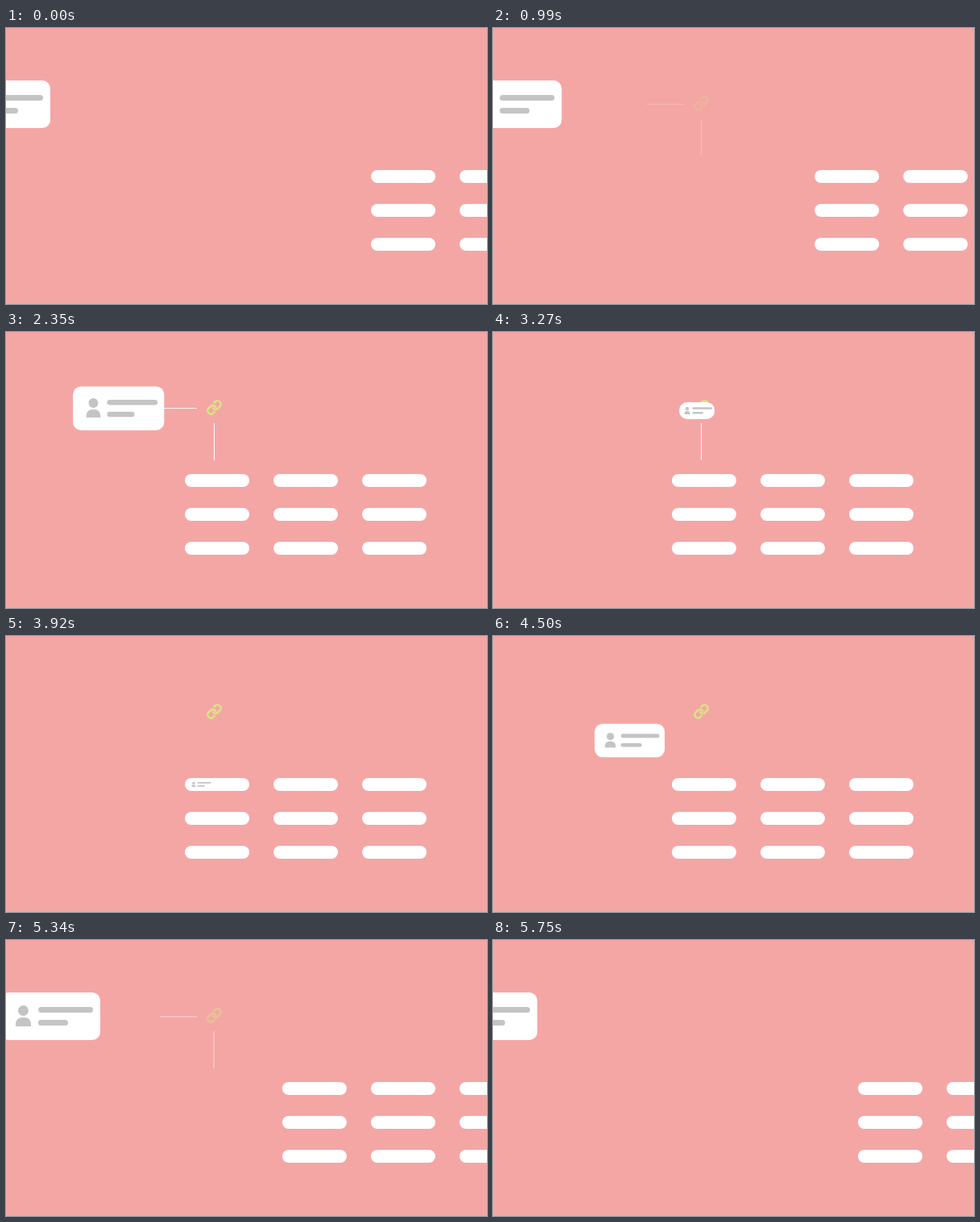
Write an HTML page that moves like this. It is 597 by 342 pixels and loops after 5.88 s.

```html
<!DOCTYPE html>
<html lang="en">
<head>
<meta charset="utf-8">
<title>Contact linking</title>
<style>
  html, body { margin: 0; width: 100%; height: 100%; overflow: hidden; background: #f4a6a5; }
  svg { display: block; width: 597px; height: 342px; }
</style>
</head>
<body>
<svg viewBox="0 0 597 342">
  <defs>
    <rect id="cell" width="80" height="16" rx="8"/>
    <g id="row">
      <use href="#cell"/><use href="#cell" x="110"/><use href="#cell" x="220"/>
    </g>
  </defs>

  <g id="link" transform="translate(248.66 83.66) scale(.82)" fill="none" stroke="#d9e382" stroke-width="3.2" stroke-linecap="round">
    <path d="M10 13a5 5 0 0 0 7.54.54l3-3a5 5 0 0 0-7.07-7.07l-1.72 1.71"/>
    <path d="M14 11a5 5 0 0 0-7.54-.54l-3 3a5 5 0 0 0 7.07 7.07l1.71-1.71"/>
  </g>
  <rect id="across" x="191" y="94" width="46" height="1" fill="#fff"/>
  <rect id="down" x="258" y="113" width="1" height="46" fill="#fff"/>

  <g id="cells" fill="#fff">
    <use href="#row" y="176"/><use href="#row" y="218"/><use href="#row" y="260"/>
  </g>

  <g id="card">
    <rect id="panel" rx="10" fill="#fff"/>
    <g id="content" fill="#c4c4c4">
      <circle cx="27.5" cy="22.5" r="6.5"/>
      <path d="M18 42v-3a8 8 0 0 1 8-8h3a8 8 0 0 1 8 8v3z"/>
      <rect x="46" y="18" width="68" height="7" rx="3.5"/>
      <rect x="46" y="34" width="37" height="7" rx="3.5"/>
    </g>
  </g>
</svg>
<script>
const LOOP = 5880;
const $ = id => document.getElementById(id);
const set = (id, attrs) => {
  for (const name in attrs) $(id).setAttribute(name, attrs[name]);
};
const lerp = (a, b, p) => a + (b - a) * p;

// Card poses: x, y, scale
const OFF = [-68, 65, 1];
const LEFT = [62, 65, 1];
const AT_LINK = [231.3, 84.2, .361];
const IN_CELL = [226, 176.5, .25];

// Each move advances in discrete steps between its first and last change.
const moves = [
  { first: 930, last: 1530, steps: 14, lead: .077, to: LEFT },
  { first: 2350, last: 3000, steps: 14, lead: .077, to: AT_LINK },
  { first: 3270, last: 3920, steps: 15, lead: .0175, to: IN_CELL },
  { first: 4250, last: 4880, steps: 14, lead: .077, to: LEFT },
  { first: 5140, last: 5750, steps: 14, lead: .077, to: OFF }
];

// cubic-bezier(0, 0, .58, 1), solved by bisection
function easeOut(x) {
  let lo = 0, hi = 1;
  for (let i = 0; i < 24; i++) {
    const s = (lo + hi) / 2;
    if (1.74 * s * s - .74 * s ** 3 < x) lo = s; else hi = s;
  }
  return 3 * lo * lo - 2 * lo ** 3;
}

function progress({ first, last, steps, lead }, t) {
  if (t < first) return 0;
  if (t >= last) return 1;
  const step = Math.floor((t - first + 5) / (last - first) * (steps - 1));
  return easeOut(lead + (1 - lead) * step / (steps - 1));
}

function render(t) {
  const p = moves.map(move => progress(move, t));
  const [enter, toLink, toCell, back, leave] = p;

  let pose = OFF;
  moves.forEach((move, i) => {
    pose = pose.map((v, k) => lerp(v, move.to[k], p[i]));
  });
  const [x, y, scale] = pose;
  set('card', { transform: `translate(${x} ${y})` });
  set('panel', { width: 123 * scale, height: 59 * scale });
  set('content', { transform: `scale(${scale})` });

  const shown = enter - leave;
  set('cells', { transform: `translate(${lerp(453, 222, shown)} 0)` });
  set('link', { opacity: shown });

  // The lines return at once, softer and wider, when the card is back.
  const returned = back === 1;
  const soft = .62 * (1 - leave);
  set('across', { height: returned ? 2 : 1, opacity: returned ? soft : enter - toLink });
  set('down', {
    x: returned ? 257 : 258,
    width: returned ? 2 : 1,
    opacity: returned ? soft : enter - toCell
  });
}

const start = performance.now();
function tick() {
  render((performance.now() - start) % LOOP);
  requestAnimationFrame(tick);
}
tick();
</script>
</body>
</html>
```
